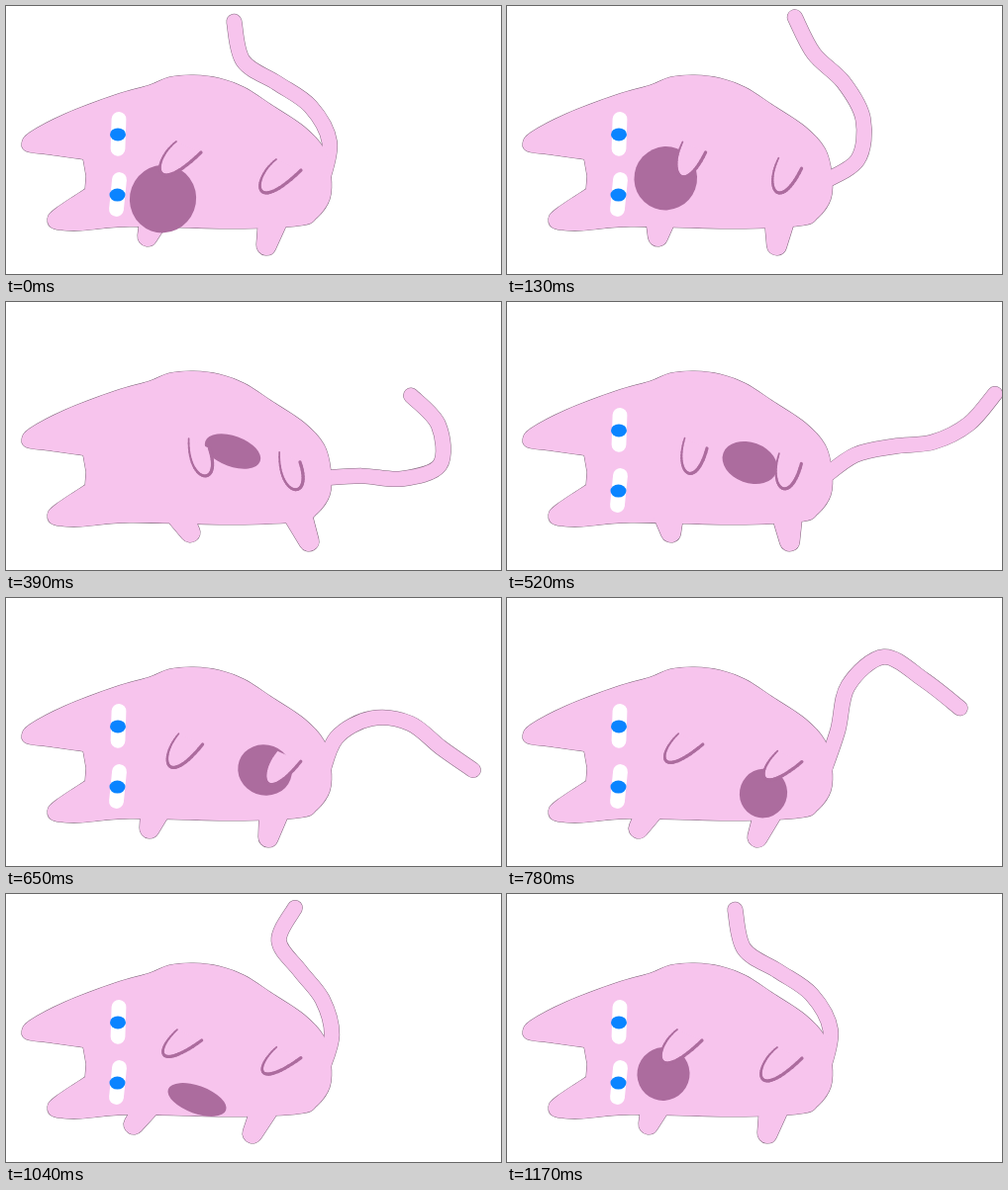
Write an HTML page with a canvas that moves like this. It is 500 px wide and 271 px high and loops after 1.3 s.

```html
<!DOCTYPE html>
<html lang="en">
<head>
<meta charset="utf-8">
<title>Tail wag</title>
<style>
html, body { margin: 0; width: 100%; height: 100%; overflow: hidden; background: #fff; }
canvas { display: block; }
</style>
</head>
<body>
<canvas id="stage" width="500" height="271"></canvas>
<script>
const ctx = document.getElementById('stage').getContext('2d');
const PINK = '#f7c4ed', PLUM = '#ac6c9e', EDGE = '#84697f', BLUE = '#0a84ff';
const STEP = 130, STEPS = 10;
const ROOT = [319, 178];

// foot: front foot x; swing, depth: shape of the arms;
// spot: centre and radii; bone: length of a tail bone; tail: bone angles in degrees
const start = {
  step: 0, foot: 143, swing: 0, depth: 196, spot: [158.5, 195, 33.5, 34.5],
  bone: 41, tail: [-79, -118, -145, -147, -103]
};
const keys = [
  start,
  { step: 2, foot: 162, swing: 0.9, depth: 190, spot: [162, 153.5, 30, 30],
    bone: 42.5, tail: [14, -47, -91, -125, -132] },
  { step: 3, foot: 186, swing: 1.05, depth: 188, spot: [229, 151, 29.5, 15.5],
    bone: 40.6, tail: [-3, 4, -20, -92, -133] },
  { step: 5, foot: 145, swing: 0.2, depth: 194, spot: [261.5, 174, 27.5, 25.5],
    bone: 39.7, tail: [-68, -29, 7, 38, 35] },
  { step: 6, foot: 133, swing: 0.1, depth: 184, spot: [259, 197.5, 24, 25],
    bone: 46.5, tail: [-71, -77, -39, 30, 38] },
  { step: 8, foot: 129, swing: 0.08, depth: 180, spot: [193, 208, 31, 14],
    bone: 37, tail: [-74, -105, -128, -125, -64] },
  { ...start, step: 9, spot: [158, 182, 26.5, 27] }
];

const mix = (a, b, t) => Array.isArray(a) ? a.map((v, i) => mix(v, b[i], t)) : a + (b - a) * t;

function poseAt(step) {
  const i = Math.max(1, keys.findIndex(k => k.step >= step));
  const a = keys[i - 1], b = keys[i], t = (step - a.step) / (b.step - a.step);
  const pose = {};
  for (const name in a) pose[name] = mix(a[name], b[name], t);
  return pose;
}

// Smooth curve through a list of points
function spline(pts) {
  const path = new Path2D();
  const at = i => pts[Math.max(0, Math.min(pts.length - 1, i))];
  path.moveTo(...pts[0]);
  for (let i = 0; i < pts.length - 1; i++) {
    const [a, b, c, d] = [at(i - 1), at(i), at(i + 1), at(i + 2)];
    path.bezierCurveTo(
      b[0] + (c[0] - a[0]) / 6, b[1] + (c[1] - a[1]) / 6,
      c[0] - (d[0] - b[0]) / 6, c[1] - (d[1] - b[1]) / 6, c[0], c[1]);
  }
  return path;
}

const body = spline([
  [78, 155], [42, 150], [21, 147], [16, 139], [24, 128], [60, 109], [110, 90],
  [145, 80], [165, 72], [190, 70], [215, 73], [241, 82.5], [268, 100], [301, 122],
  [321, 144], [328, 170], [327, 195], [314, 214], [297, 222], [230, 225],
  [125, 223], [75, 227], [48, 225], [42, 215], [50, 205], [80, 185]]);
body.lineTo(81, 172);
body.closePath();

function tailPath({ bone, tail }) {
  const pts = [ROOT];
  tail.forEach((deg, i) => {
    const a = deg * Math.PI / 180, [x, y] = pts[i];
    pts.push([x + bone * Math.cos(a), y + bone * Math.sin(a)]);
  });
  return spline(pts);
}

// The hip follows the foot at a part of its swing
function leg(foot, dx, dy) {
  const r = 10, top = 216, hip = 0.55 * (foot - 145) + dx;
  const left = 136 + hip, right = 167 + hip, x = foot + dx, y = 233 + dy;
  const tangent = (px, side) => {
    const vx = px - x, vy = top - y;
    return Math.atan2(vy, vx) + side * Math.acos(Math.min(1, r / Math.hypot(vx, vy)));
  };
  const path = new Path2D();
  path.moveTo(left, top);
  path.arc(x, y, r, tangent(left, -1), tangent(right, 1), true);
  path.lineTo(right, top);
  path.closePath();
  return path;
}

function line(path, color, width) {
  ctx.strokeStyle = color;
  ctx.lineWidth = width;
  ctx.stroke(path);
}

function fill(path, color) {
  ctx.fillStyle = color;
  ctx.fill(path);
}

function oval(x, y, rx, ry, tilt, color) {
  const path = new Path2D();
  path.ellipse(x, y, rx, ry, tilt, 0, 2 * Math.PI);
  fill(path, color);
}

// Pink inside, with a line that thickens towards its end
function arm({ swing: w, depth }, dx, dy) {
  const curve = [
    [172 + 12 * w, 137 + w], [146 + 35 * w, 157 + 27 * w],
    [148 + 68 * w, depth], [197 + 8 * w, 148]
  ].map(([x, y]) => [x + dx, y + dy]);
  const path = new Path2D();
  path.moveTo(...curve[0]);
  path.bezierCurveTo(...curve.slice(1).flat());
  fill(path, PINK);

  const at = t => {
    let pts = curve;
    while (pts.length > 1) pts = pts.slice(1).map((p, i) => mix(pts[i], p, t));
    return pts[0];
  };
  const n = 28;
  for (let i = 0; i < n; i++) {
    const part = new Path2D();
    part.moveTo(...at(i / n));
    part.lineTo(...at((i + 1) / n));
    line(part, PLUM, 1.7 + 1.5 * Math.min(1, 1.5 * i / n));
  }
}

function eye(x, y, lean) {
  const white = new Path2D();
  white.moveTo(x + lean, y - 15);
  white.lineTo(x - lean, y + 15);
  line(white, '#fff', 14.8);
  oval(x - 0.5, y + 0.6, 8, 6.5, 0, BLUE);
}

function draw(step) {
  const pose = poseAt(step), w = pose.swing;
  ctx.fillStyle = '#fff';
  ctx.fillRect(0, 0, 500, 271);
  ctx.lineCap = ctx.lineJoin = 'round';

  const tail = tailPath(pose);
  const parts = [body, leg(pose.foot, 0, 0), leg(pose.foot, 120, 9)];
  line(tail, EDGE, 16);
  parts.forEach(p => line(p, EDGE, 1.1));
  line(tail, PINK, 15);
  parts.forEach(p => fill(p, PINK));

  oval(...pose.spot, 0.35, PLUM);
  arm(pose, 0, 0);
  arm(pose, 101 - 9 * w, 18 - 4 * w);

  const blink = step === 2 || step === 3;
  if (!blink) {
    eye(113.5, 129.3, 0.5);
    eye(113, 190.5, 1.5);
  }
}

function tick() {
  draw(Math.floor(performance.now() / STEP) % STEPS);
  requestAnimationFrame(tick);
}
tick();
</script>
</body>
</html>
```
